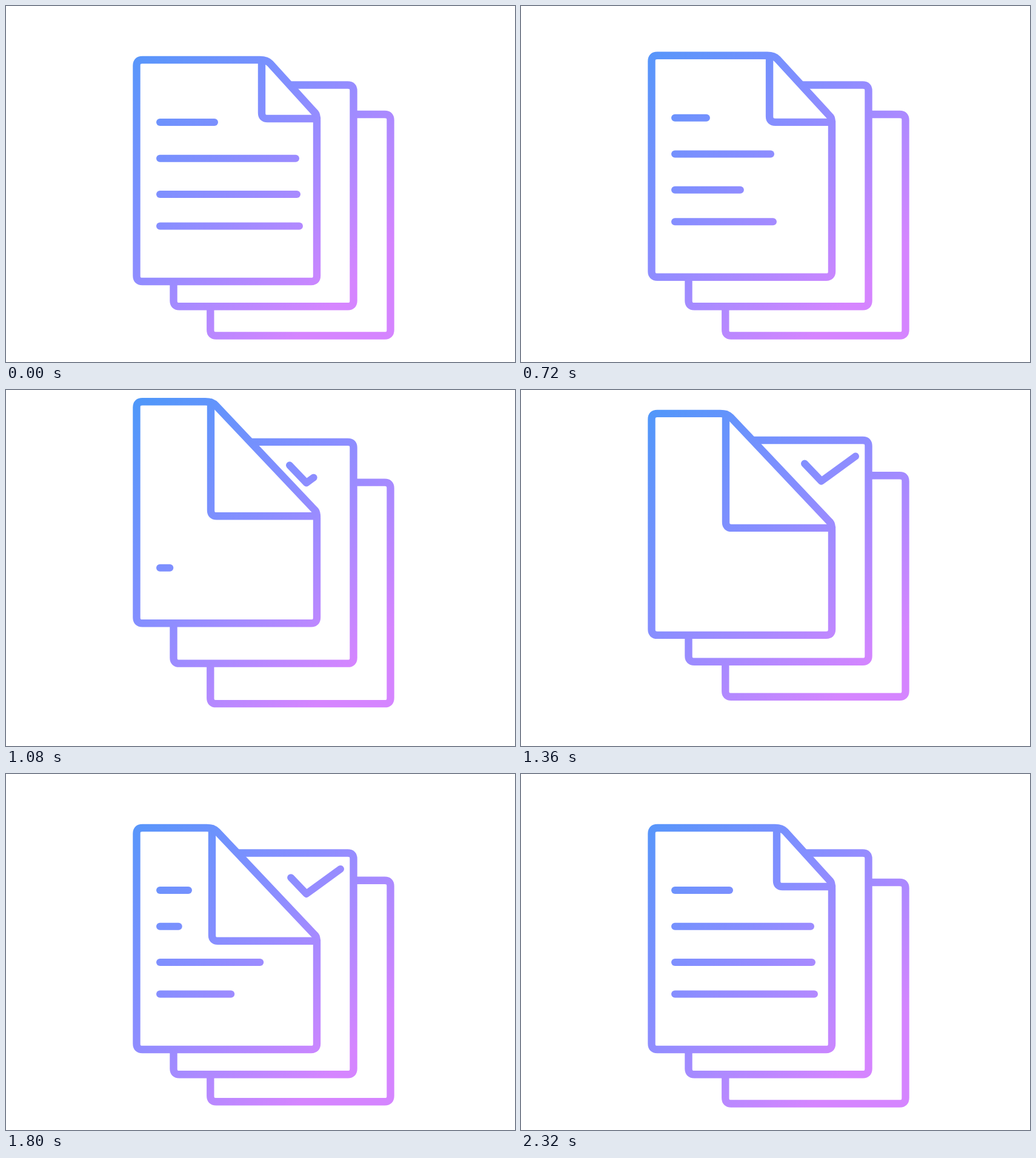
Animation of 840x588 px, one loop 3000 ms. Source, as an HTML page:

```html
<!DOCTYPE html>
<html lang="en">
<head>
<meta charset="utf-8">
<title>Stack of documents</title>
<style>
  html, body { margin: 0; width: 100%; height: 100%; overflow: hidden; background: #fff; }
  svg { display: block; width: 840px; height: 588px; }
  path { fill: none; stroke: url(#ink); stroke-width: 12.4; stroke-linecap: round; stroke-linejoin: round; }
  .sheet { fill: #fff; }
  .mark { stroke-width: 12; }
</style>
</head>
<body>
<svg viewBox="0 0 840 588">
  <defs>
    <linearGradient id="ink" gradientUnits="userSpaceOnUse" x1="100" y1="100" x2="515" y2="515">
      <stop offset="0" stop-color="#4a98f9"/>
      <stop offset=".5" stop-color="#868eff"/>
      <stop offset="1" stop-color="#d585ff"/>
    </linearGradient>
  </defs>
  <path id="back" class="sheet"/>
  <path id="middle" class="sheet"/>
  <path id="check" class="mark" pathLength="1"/>
  <path id="front" class="sheet"/>
  <path id="flap"/>
  <g id="lines"></g>
</svg>
<script>
const LOOP = 3000, STEP = 40, R = 9.5;
const $ = id => document.getElementById(id);

const smooth = p => p * p * (3 - 2 * p);
const quadIn = p => p * p;

// Eased progress of t between two times, 0 to 1
const ramp = (t, from, to, ease = smooth) =>
  ease(Math.min(1, Math.max(0, (t - from) / (to - from))));

// Goes from 0 to 1 during `out` and returns to 0 during `back`
const swing = (t, out, back, ease) => ramp(t, ...out, ease) - ramp(t, ...back);

const LIFT = {
  front:  { height: 70, out: [626, 1098], back: [1161, 1727] },
  middle: { height: 53, out: [728, 1198], back: [1247, 1812] },
  back:   { height: 38, out: [783, 1253], back: [1337, 1902] }
};
const FOLD = { out: [633, 1000], back: [1748, 2315] };
const CHECK = { draw: [880, 1280], erase: [1743, 2310] };
const LINES = [
  { y: 192,   length: 90,  out: [182, 1009],  back: [1415, 2163], ease: quadIn },
  { y: 251.8, length: 224, out: [371, 1014],  back: [1668, 2235], ease: quadIn },
  { y: 311,   length: 226, out: [120, 950],   back: [1490, 1960], ease: quadIn },
  { y: 363.5, length: 230, out: [448, 1203],  back: [1605, 1990], ease: smooth }
];

for (const line of LINES) {
  line.el = document.createElementNS("http://www.w3.org/2000/svg", "path");
  line.el.setAttribute("class", "mark");
  $("lines").append(line.el);
}

const setPath = (el, d) => el.setAttribute("d", d);
const show = (el, on) => { el.style.visibility = on ? "visible" : "hidden"; };
const lift = (t, { height, out, back }) => -height * swing(t, out, back);

// Bottom edge, left edge and top-left corner, shared by every sheet
const leftSide = (l, t, r, b) =>
  `V${b - R}Q${r} ${b} ${r - R} ${b}H${l + R}Q${l} ${b} ${l} ${b - R}V${t + R}Q${l} ${t} ${l + R} ${t}Z`;

function sheet(l, t, r, b) {
  return `M${l + R} ${t}H${r - R}Q${r} ${t} ${r} ${t + R}` + leftSide(l, t, r, b);
}

function drawFront(t, dy) {
  const fold = swing(t, FOLD.out, FOLD.back);
  const top = 89 + dy, right = 513;
  const fx = 422 - 84 * fold, fy = 186 + 92 * fold + dy;
  const sx = fx + 14 - 6 * fold;
  setPath($("front"),
    `M${215.5 + R} ${top}H${sx - 17}Q${sx - 5.5} ${top} ${sx} ${top + 6}` +
    `L510.5 ${fy - 9}Q${right} ${fy - 6} ${right} ${fy + 3}` +
    leftSide(215.5, top, right, 455 + dy));
  setPath($("flap"), `M${fx} ${top + 1}V${fy - R}Q${fx} ${fy} ${fx + R} ${fy}H${right}`);

  for (const { el, y, length, out, back, ease } of LINES) {
    const size = length * (1 - swing(t, out, back, ease));
    setPath(el, `M254 ${y + dy}h${size}`);
    show(el, size > 0.1);
  }
}

function drawCheck(t, dy) {
  const el = $("check");
  const start = ramp(t, ...CHECK.erase), end = ramp(t, ...CHECK.draw);
  setPath(el, `M468 ${169 + dy}L495.7 ${198 + dy}L552 ${157 + dy}`);
  el.setAttribute("stroke-dasharray", `${end - start} 2`);
  el.setAttribute("stroke-dashoffset", -start);
  show(el, end - start > 0.001);
}

function draw(t) {
  const y2 = lift(t, LIFT.middle), y3 = lift(t, LIFT.back);
  setPath($("back"), sheet(337.3, 179 + y3, 634.5, 544.5 + y3));
  setPath($("middle"), sheet(276.5, 130.5 + y2, 573.5, 496.3 + y2));
  drawCheck(t, y2);
  drawFront(t, lift(t, LIFT.front));
}

const begin = performance.now();
function tick() {
  const t = (performance.now() - begin) % LOOP;
  draw(Math.floor(t / STEP) * STEP);
  requestAnimationFrame(tick);
}
tick();
</script>
</body>
</html>
```
